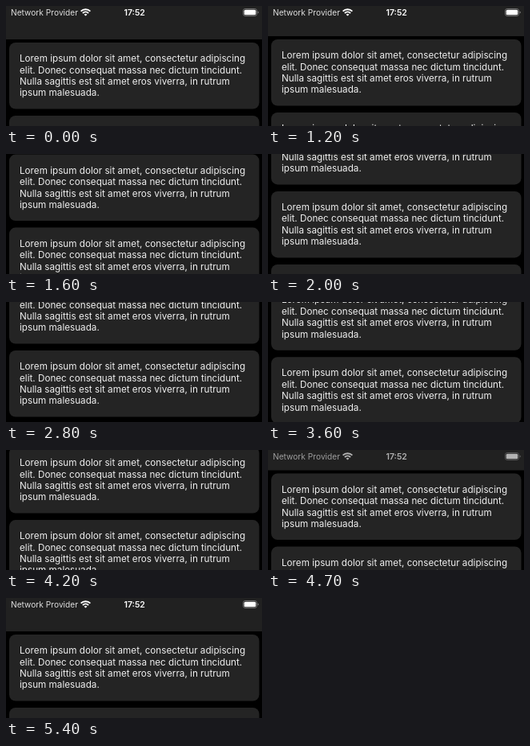
These frames come from a looping animation (320 px wide and 151 px high, 6.5 s). An HTML page:

```html
<!DOCTYPE html>
<html lang="en">
<head>
<meta charset="utf-8">
<style>
  html, body { margin: 0; width: 100%; height: 100%; overflow: hidden; background: #000; }
  svg { display: block; width: 100%; height: 100%; }
  text { font-family: Inter, "Open Sans", sans-serif; }
  .body { font-size: 11.7px; fill: #efefef; }
  .carrier { font-size: 10.2px; fill: #dedede; }
  .clock { font-size: 10.5px; font-weight: 600; fill: #fff; text-anchor: middle; }
</style>
</head>
<body>
<svg viewBox="0 0 320 151">
  <defs>
    <g id="card">
      <rect x="4" width="312.5" height="83.5" rx="8" fill="#242424"/>
      <text class="body">
        <tspan x="17" y="24.2">Lorem ipsum dolor sit amet, consectetur adipiscing</tspan>
        <tspan x="17" y="38.6">elit. Donec consequat massa nec dictum tincidunt.</tspan>
        <tspan x="17" y="53">Nulla sagittis est sit amet eros viverra, in rutrum</tspan>
        <tspan x="17" y="67.4">ipsum malesuada.</tspan>
      </text>
    </g>
  </defs>

  <g id="page">
    <rect y="-60" width="320" height="102" fill="#212121"/>
  </g>

  <g id="status">
    <text class="carrier" x="6" y="11.7">Network Provider</text>
    <g transform="translate(99.5 12.6)" fill="none" stroke="#fff" stroke-width="1.9">
      <path d="M-5.9-5.9A8.3 8.3 0 0 1 5.9-5.9M-3.6-3.6A5.1 5.1 0 0 1 3.6-3.6"/>
      <path d="M0 0L-1.9-1.9A2.7 2.7 0 0 1 1.9-1.9Z" fill="#fff" stroke="none"/>
    </g>
    <text class="clock" x="160.7" y="11.8">17:52</text>
    <rect x="296.5" y="3.5" width="17" height="9" rx="2.6" fill="none" stroke="#858585" stroke-width=".8"/>
    <rect x="297.7" y="4.7" width="14.6" height="6.6" rx="1.6" fill="#fff"/>
    <path d="M314.7 6.4a1.7 1.7 0 0 1 0 3.2z" fill="#858585"/>
  </g>
</svg>
<script>
const LOOP = 6500, STEP = 100, CARD_TOP = 46, CARD_PITCH = 92;

// A finger drags the list from start to release, then it glides towards rest.
const swipeDown = { start: 1200, release: 1500, end: 2600, from: 4, rest: 387.5, glide: 305.5, decay: 500 };
const swipeUp = { start: 2800, release: 3400, end: 5400, from: 353, rest: -6, glide: -240, decay: 549 };

const page = document.getElementById('page');
const status = document.getElementById('status');

for (let i = 0; i < 6; i++) {
  const card = document.createElementNS('http://www.w3.org/2000/svg', 'use');
  card.setAttribute('href', '#card');
  card.setAttribute('y', CARD_TOP + i * CARD_PITCH);
  page.append(card);
}

function swipe(s, time) {
  if (time < s.release) {
    const u = (time - s.start) / (s.release - s.start);
    return s.from + (s.rest - s.glide - s.from) * u ** 2.25;
  }
  return s.rest - s.glide * Math.exp((s.release - Math.min(time, s.end)) / s.decay);
}

function offsetAt(time) {
  if (time < swipeDown.start || time >= swipeUp.end) return 0;
  return Math.max(0, swipe(time < swipeUp.start ? swipeDown : swipeUp, time));
}

function draw() {
  const time = Math.floor(performance.now() % LOOP / STEP) * STEP;
  const offset = offsetAt(time);
  page.setAttribute('transform', `translate(0 ${-offset})`);
  status.setAttribute('opacity', Math.max(0, Math.min(1, (40 - offset) / 36)));
  requestAnimationFrame(draw);
}
draw();
</script>
</body>
</html>
```
